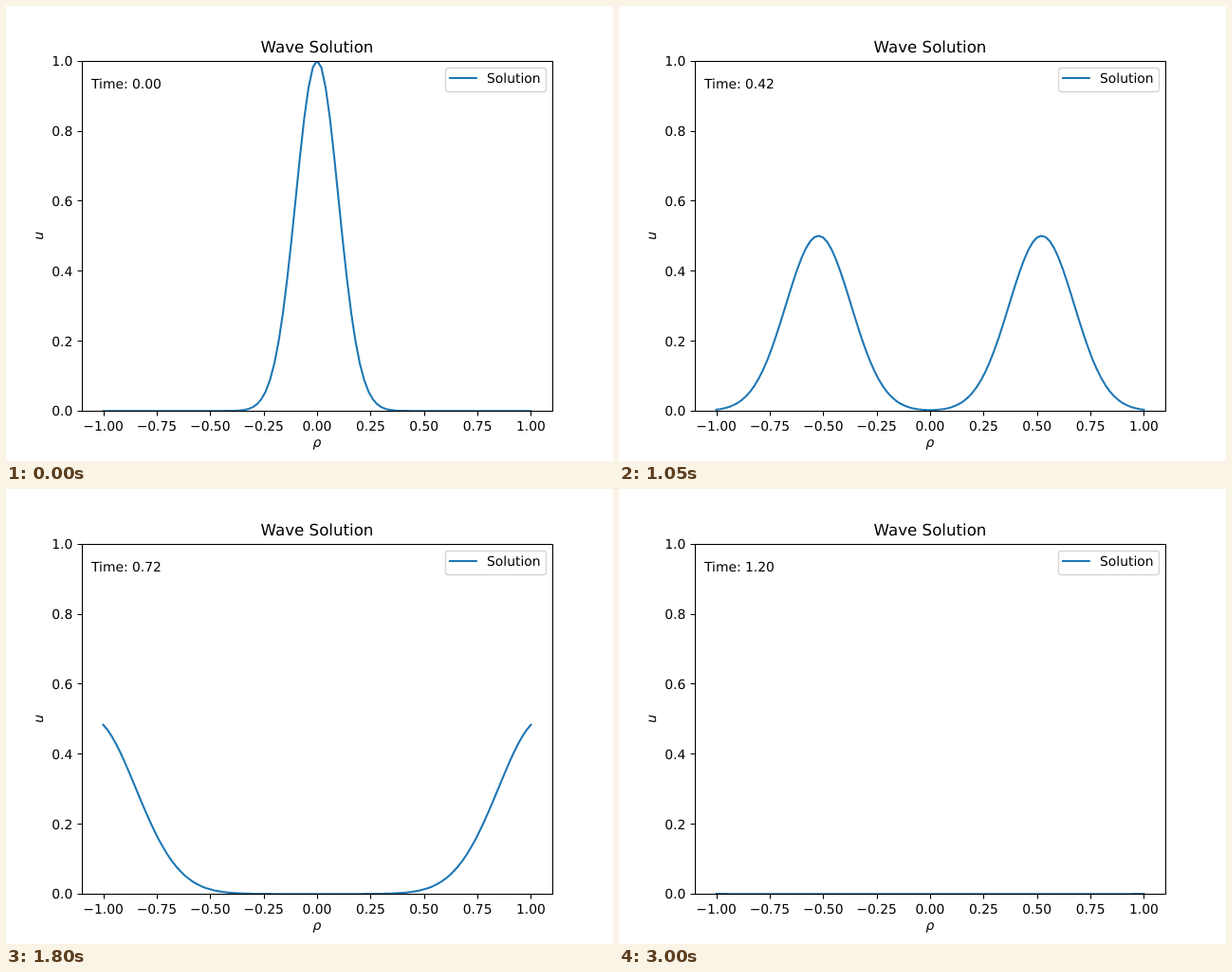
Write an HTML page that moves like this. It is 640 px wide and 480 px high and loops after 3.05 s.

```html
<!DOCTYPE html>
<html lang="en">
<head>
<meta charset="utf-8">
<title>Wave Solution</title>
<style>
  html, body { margin: 0; width: 100%; height: 100%; overflow: hidden; background: #fff; }
  svg { display: block; width: 640px; height: 480px; }
  text { font: 13.889px "DejaVu Sans", sans-serif; text-rendering: geometricPrecision; white-space: pre; }
  .title { font-size: 16.667px; }
  .math { font-style: italic; }
  .mid { text-anchor: middle; }
  .end { text-anchor: end; }
  .axis { fill: none; stroke: #000; stroke-width: 1.11; }
  .line { fill: none; stroke: #1f77b4; stroke-width: 2.083; stroke-linecap: square; stroke-linejoin: round; }
  .box { fill: #fff; fill-opacity: .8; stroke: #ccc; stroke-opacity: .8; stroke-width: 1.39; }
</style>
</head>
<body>
<svg viewBox="0 0 640 480">
  <clipPath id="plot"><rect x="80" y="58" width="496" height="369"/></clipPath>
  <g clip-path="url(#plot)"><path id="wave" class="line"/></g>
  <path id="ticks" class="axis"/>
  <rect class="axis" x="80.5" y="58.5" width="496" height="369"/>
  <g id="labels"></g>
  <text class="title mid" x="328" y="49">Wave Solution</text>
  <text class="math mid" x="328" y="465">ρ</text>
  <text class="math mid" transform="translate(39 242.4) rotate(-90)">u</text>
  <text id="clock" x="90" y="87">Time: 0.00</text>
  <rect class="box" x="463.5" y="65.5" width="106" height="25" rx="2.78"/>
  <path class="line" d="M468 76H495.8"/>
  <text x="507" y="81">Solution</text>
</svg>
<script>
const STEP = 50, STEPS = 61, DT = 0.02, CELLS = 100;
const byId = id => document.getElementById(id);
const px = rho => 80 + 496 * (rho + 1.1) / 2.2;
const py = u => 427.2 - 369.6 * u;
const snap = v => Math.floor(v + 0.5) + 0.5;

function addLabel(text, x, y, cls) {
  const el = document.createElementNS("http://www.w3.org/2000/svg", "text");
  el.setAttribute("x", x);
  el.setAttribute("y", y);
  el.setAttribute("class", cls);
  el.textContent = text;
  byId("labels").append(el);
}

function drawAxes() {
  let d = "";
  for (let i = -4; i <= 4; i++) {
    const rho = i / 4;
    d += `M${snap(px(rho))} 427.5v5`;
    addLabel(rho.toFixed(2).replace("-", "−"), px(rho), 448, "mid");
  }
  for (let i = 0; i <= 5; i++) {
    const u = i / 5;
    d += `M80.5 ${snap(py(u))}h-5`;
    addLabel(u.toFixed(1), 70.28, Math.round(py(u) + 5.27), "end");
  }
  byId("ticks").setAttribute("d", d);
}

// Two pulses carried along the characteristics drho/dt = ±(1 ± rho).
const pulse = s => 0.5 * Math.exp(-s * s / 0.02);
const solution = (rho, t) =>
  pulse((1 + rho) * Math.exp(-t) - 1) + pulse((1 - rho) * Math.exp(-t) - 1);

let shown = -1;
function render(now) {
  const step = Math.floor(now / STEP) % STEPS;
  if (step !== shown) {
    shown = step;
    const t = step * DT;
    const points = Array.from({ length: CELLS + 1 }, (_, i) => {
      const rho = 2 * i / CELLS - 1;
      return px(rho).toFixed(2) + " " + py(solution(rho, t)).toFixed(2);
    });
    byId("wave").setAttribute("d", "M" + points.join("L"));
    byId("clock").textContent = "Time: " + t.toFixed(2);
  }
}

function tick() {
  render(performance.now());
  requestAnimationFrame(tick);
}

drawAxes();
render(0);
requestAnimationFrame(tick);
</script>
</body>
</html>
```
